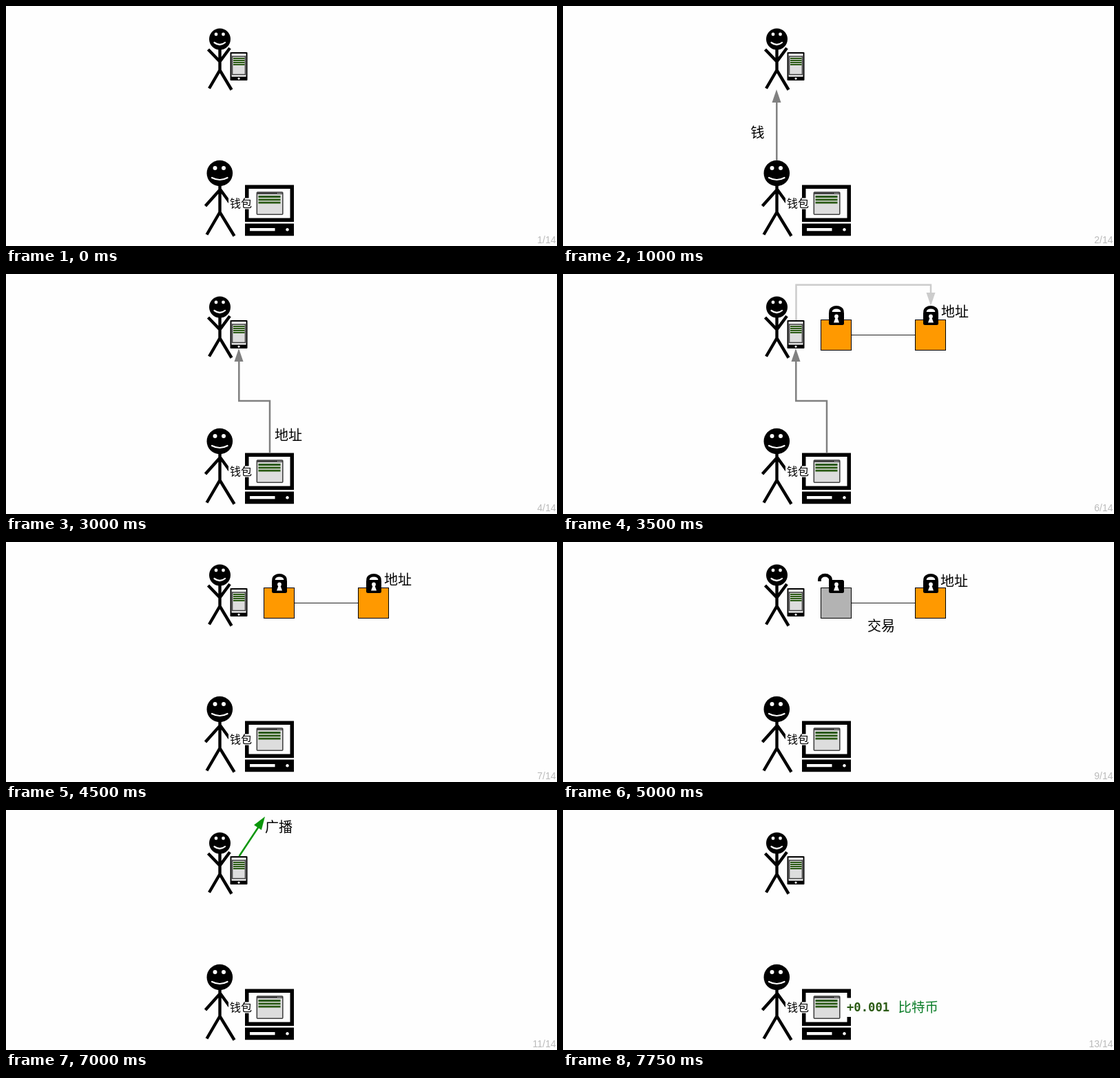
These frames come from a looping animation (800 by 348 pixels, 8000 ms). An HTML page:

```html
<!DOCTYPE html>
<html lang="zh">
<head>
<meta charset="utf-8">
<style>
html, body { margin: 0; width: 100%; height: 100%; overflow: hidden; background: #fefefe; }
svg { display: block; width: 800px; height: 348px; }
text { font: 20px "Noto Sans CJK SC", "Noto Sans CJK", sans-serif; }
#count { font: 14px "Liberation Sans", sans-serif; fill: #bbb; text-anchor: end; }
.line { fill: none; stroke: currentColor; stroke-width: 2.5; }
.limbs { fill: none; stroke: #000; stroke-width: 4.4; }
.smile { fill: none; stroke: #fefefe; stroke-width: 2.2; stroke-linecap: round; }
.white { fill: #fefefe; }
.win { fill: #ddd; stroke: #444; stroke-width: 1.6; }
.rows { stroke: #2b5a14; fill: none; }
.block { stroke: #000; }
.gain { fill: #2b5a14; font: bold 17.2px "DejaVu Sans Mono", monospace; }
</style>
</head>
<body>
<svg viewBox="0 0 800 348">
  <defs>
    <path id="head" d="M0 0 6.5 19H-6.5z" fill="currentColor"/>
    <g id="body">
      <rect x="-11" y="55" width="22" height="19" rx="2.5"/>
      <path class="white" d="M-1.3 63-4 70.500H4L1.300 63z"/>
      <circle class="white" cy="61.500" r="2.900"/>
    </g>
    <g id="lock">
      <path d="M-8.500 58V54.500a8.500 6.300 0 0 1 17 0V58" fill="none" stroke="#000" stroke-width="4.500"/>
      <use href="#body"/>
    </g>
    <g id="openLock">
      <path d="M-24.500 57V54.500a8 6.300 0 0 1 16 0V58" fill="none" stroke="#000" stroke-width="4.800"/>
      <use href="#body"/>
    </g>
    <rect id="block" class="block" x="-22.500" y="66.500" width="44" height="44"/>
  </defs>

  <!-- receiver with phone -->
  <path class="limbs" d="M310.500 60V94M293.500 63 310.500 80.500 325 61M295 119.500 310.500 93 327.500 121.500"/>
  <circle cx="310.500" cy="48" r="15.500"/>
  <g class="white"><circle cx="305" cy="41" r="2.400"/><circle cx="315.500" cy="41" r="2.400"/></g>
  <path class="smile" d="M302.500 53q8 6 15.500 0"/>
  <rect x="325.500" y="67" width="25" height="41" rx="1"/>
  <rect class="white" x="327.500" y="69" width="21" height="33.500"/>
  <rect class="win" x="328.500" y="73" width="19" height="26.500"/>
  <path class="rows" stroke-width="2" d="M330 76h16.500m-16.500 3h16.500m-16.500 3h16.500m-16.500 3h16.500"/>
  <circle class="white" cx="338" cy="105.300" r="1.500"/>

  <!-- sender with computer -->
  <path class="limbs" d="M310.500 260V300M289.500 290 311 266 327 288M291.500 331.500 310.500 299 331.500 333.500"/>
  <circle cx="310.300" cy="242.500" r="18.800"/>
  <g class="white"><circle cx="303.500" cy="235" r="3"/><circle cx="316" cy="235" r="3"/></g>
  <path class="smile" d="M299 249q11.500 6 22.500 0"/>
  <path fill-rule="evenodd" d="M347 259.500h71V313H347zM352.500 265V307.500h60V265z"/>
  <path d="M347 315.500h71V333.300H347z"/>
  <path class="white" d="M354 322h36.500v4.300H354z"/>
  <circle class="white" cx="408.500" cy="324.300" r="2.200"/>
  <rect class="win" x="364.300" y="270" width="37.500" height="32.300" rx="1"/>
  <path d="M364 271.500h38" stroke="#444" stroke-width="3"/>
  <path d="M394 271.500h6" stroke="#ccc" stroke-dasharray="1.500 .8"/>
  <path class="rows" stroke-width="2.800" d="M366.500 276.500h32m-32 4.300h32m-32 4.300h32"/>
  <rect class="white" x="323" y="278.500" width="34" height="16"/>
  <text x="325" y="291.500" style="font-size:16px">钱包</text>

  <!-- data-on: first and last step in which a group shows -->
  <g data-on="2 3">
    <g color="gray"><path class="line" d="M310.300 224V138"/><use href="#head" x="310" y="121"/></g>
    <text x="272.500" y="191">钱</text>
  </g>
  <g data-on="3 6" color="gray">
    <path class="line" d="M383 260V184H338.300V125"/><use href="#head" x="338" y="108"/>
  </g>
  <text data-on="3 5" x="390" y="240.500">地址</text>
  <g data-on="6 6" color="#ccc">
    <path class="line" d="M338.500 67V15.800H534V28"/>
    <use href="#head" transform="translate(534 46)rotate(180)"/>
  </g>
  <g data-on="5 8" fill="#f90"><use href="#block" x="397"/></g>
  <g data-on="9 10" fill="#b3b3b3"><use href="#block" x="397"/></g>
  <use data-on="5 7" href="#lock" x="397"/>
  <use data-on="8 10" href="#openLock" x="397"/>
  <g data-on="6 10">
    <path d="M419 88.500h92" stroke="#222"/>
    <use href="#block" x="534" fill="#f90"/>
    <use href="#lock" x="534"/>
  </g>
  <text data-on="6 7" x="549" y="61.500">地址</text>
  <text data-on="8 10" x="548" y="63.500">地址</text>
  <text data-on="9 10" x="442" y="128.500">交易</text>
  <g data-on="10 11">
    <g color="#0a960a">
      <path class="line" d="M338.500 67 367 24"/>
      <use href="#head" transform="translate(376 9.500)rotate(33.700)"/>
    </g>
    <text x="376" y="32">广播</text>
  </g>
  <g data-on="13 13">
    <rect class="white" x="411" y="272.500" width="140" height="27.500"/>
    <text class="gain" x="412" y="292">+0.001</text>
    <text x="486.500" y="292.500" fill="#0a7d28" style="font-size:19.500px">比特币</text>
  </g>
  <text id="count" x="798.500" y="344"></text>
</svg>
<script>
const starts = [0, 1000, 2000, 3000, 3250, 3500, 4500, 4750, 5000, 6000, 7000, 7250, 7750];
const loop = 8000;
const parts = [...document.querySelectorAll('[data-on]')].map(el => [el, ...el.dataset.on.split(' ').map(Number)]);
const count = document.getElementById('count');
const origin = performance.now();

function draw() {
  const time = Math.max(0, performance.now() - origin) % loop;
  const step = starts.filter(start => start <= time).length;
  for (const [el, first, last] of parts) {
    el.style.display = step >= first && step <= last ? '' : 'none';
  }
  count.textContent = step + '/14';
  requestAnimationFrame(draw);
}
draw();
</script>
</body>
</html>
```
